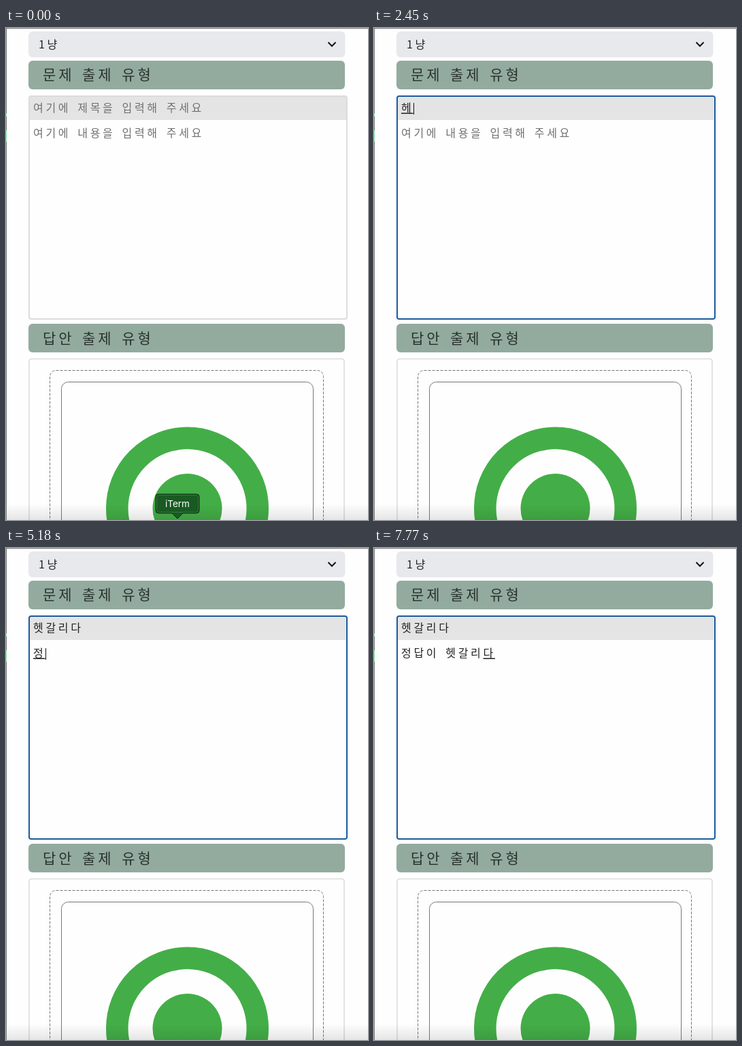
An HTML page for the animation above (8000 ms loop, 532 by 722 pixels).

```html
<!DOCTYPE html>
<html lang="ko">
<meta charset="utf-8">
<style>
  html, body { margin: 0; width: 100%; height: 100%; overflow: hidden; background: #fefefe; }
  svg { display: block; }
  text { font: 16px "Noto Sans CJK KR", "Noto Sans CJK", sans-serif; letter-spacing: 3.7px; word-spacing: 1.8px; white-space: pre; fill: #222; }
  .head { font-size: 21px; letter-spacing: 3.9px; word-spacing: 1.9px; fill: #29322d; }
  .hint { fill: #707070; }
  .bar { fill: #93ab9f; }
  .line { fill: none; stroke: #777; }
  #tip text { font: 13.5px Inter, sans-serif; letter-spacing: 0; fill: #fff; text-anchor: middle; }
</style>
<svg width="532" height="722" viewBox="0 0 532 722">
  <defs>
    <linearGradient id="shade" x2="0" y2="1">
      <stop offset="0" stop-opacity="0"/>
      <stop offset="1" stop-opacity=".1"/>
    </linearGradient>
  </defs>

  <rect x="33" y="5" width="465.5" height="38" rx="6" fill="#e8e9ed"/>
  <text x="48" y="30">1냥</text>
  <path d="M473.5 21l5.5 5.5 5.5-5.5" fill="none" stroke="#111" stroke-width="2"/>

  <rect class="bar" x="33" y="48" width="465" height="42" rx="6"/>
  <text class="head" x="54" y="75.5">문제 출제 유형</text>

  <rect x="34" y="100" width="467" height="35" rx="3" fill="#e4e4e4"/>
  <rect id="editor" x="34" y="100" width="467" height="327" rx="3" fill="none" stroke-width="2"/>
  <text id="title" x="40" y="123"></text>
  <text id="body" x="40" y="160"></text>
  <rect id="under" height="1.5" fill="#222"/>
  <rect id="caret" width="1" height="17" fill="#111"/>

  <rect class="bar" x="33" y="434" width="465" height="42" rx="6"/>
  <text class="head" x="54" y="462.5">답안 출제 유형</text>

  <rect x="34" y="485.5" width="463" height="260" rx="4" fill="none" stroke="#dcdcdc" stroke-width="1.6"/>
  <rect class="line" x="64.5" y="502.5" width="402" height="260" rx="9" stroke-dasharray="4 2"/>
  <rect class="line" x="81.5" y="519.5" width="370" height="260" rx="10"/>
  <circle cx="266.5" cy="705" r="103.25" fill="none" stroke="#43ae47" stroke-width="32.5"/>
  <circle cx="266.5" cy="705" r="51" fill="#43ae47"/>

  <rect y="698" width="532" height="24" fill="url(#shade)"/>
  <path class="line" d="M0 .5H532M.5 0V722"/>
  <path d="M.5 125v5M.5 150v17" stroke="#7fe0a0"/>

  <g id="tip">
    <path d="M224 684h56q4 0 4 4v20q0 4-4 4h-20l-8 8-8-8h-20q-4 0-4-4v-20q0-4 4-4z" fill="#185a22" stroke="#0b2b10"/>
    <rect x="221.5" y="685.5" width="61" height="25" rx="3" fill="none" stroke="#397843"/>
    <text x="252" y="703">iTerm</text>
  </g>
</svg>
<script>
  const LOOP = 8000, FOCUS = 1260, COMMIT = 4480, NEXT = 4760;
  const $ = id => document.getElementById(id);
  const set = (el, attrs) => { for (const k in attrs) el.setAttribute(k, attrs[k]); };

  // [time, value] steps; the latest one reached applies
  const titleSteps = [
    [0, '여기에 제목을 입력해 주세요'], [FOCUS, ''],
    [2310, 'ㅎ'], [2380, '헤'], [2520, '헷'],
    [3150, '헷ㄱ'], [3290, '헷가'], [3430, '헷갈'],
    [3640, '헷갈ㄹ'], [3780, '헷갈리'], [4060, '헷갈리ㄷ'], [4200, '헷갈리다']
  ];
  const bodySteps = [
    [0, '여기에 내용을 입력해 주세요'], [NEXT, ''],
    [4970, 'ㅈ'], [5040, '저'], [5110, '정'],
    [5250, '정ㄷ'], [5320, '정다'], [5390, '정답'],
    [5530, '정답ㅇ'], [5600, '정답이'], [5740, '정답이 '],
    [5880, '정답이 ㅎ'], [5950, '정답이 헤'], [6090, '정답이 헷'],
    [6300, '정답이 헷ㄱ'], [6370, '정답이 헷가'], [6440, '정답이 헷갈'],
    [6580, '정답이 헷갈ㄹ'], [6650, '정답이 헷갈리'],
    [6790, '정답이 헷갈리ㄷ'], [6930, '정답이 헷갈리다']
  ];
  const caretSteps = [
    [0, 0], [FOCUS, 1], [1820, .6], [1890, .3], [1960, 0],
    [2170, .5], [2240, 1], [7630, .5], [7770, 0]
  ];
  const at = (steps, t) => steps.findLast(s => s[0] <= t)[1];

  function show(el, str, hint) {
    if (el.textContent !== str) el.textContent = str;
    set(el, { class: hint ? 'hint' : '' });
  }

  function draw(t) {
    const focused = t >= FOCUS, inBody = t >= NEXT;
    show($('title'), at(titleSteps, t), !focused);
    show($('body'), at(bodySteps, t), !inBody);
    set($('editor'), { stroke: focused ? '#1c5b9d' : '#dcdcdc' });

    const line = $(inBody ? 'body' : 'title'), str = line.textContent;
    const base = inBody ? 160 : 123;
    const end = str ? 40 + line.getComputedTextLength() : 40;
    set($('caret'), { x: Math.round(end), y: base - 13, opacity: at(caretSteps, t) });

    const composing = focused && str && !str.endsWith(' ') && (inBody || t < COMMIT);
    set($('under'), { x: end - 18.4, y: base + 1.5, width: composing ? 17.4 : 0 });

    const step = Math.floor(t / 70) * 70;
    set($('tip'), { opacity: Math.max(0, 1 - step / 225) });
  }

  function frame(now) {
    draw(now % LOOP);
    requestAnimationFrame(frame);
  }
  draw(0);
  requestAnimationFrame(frame);
</script>
</html>
```
